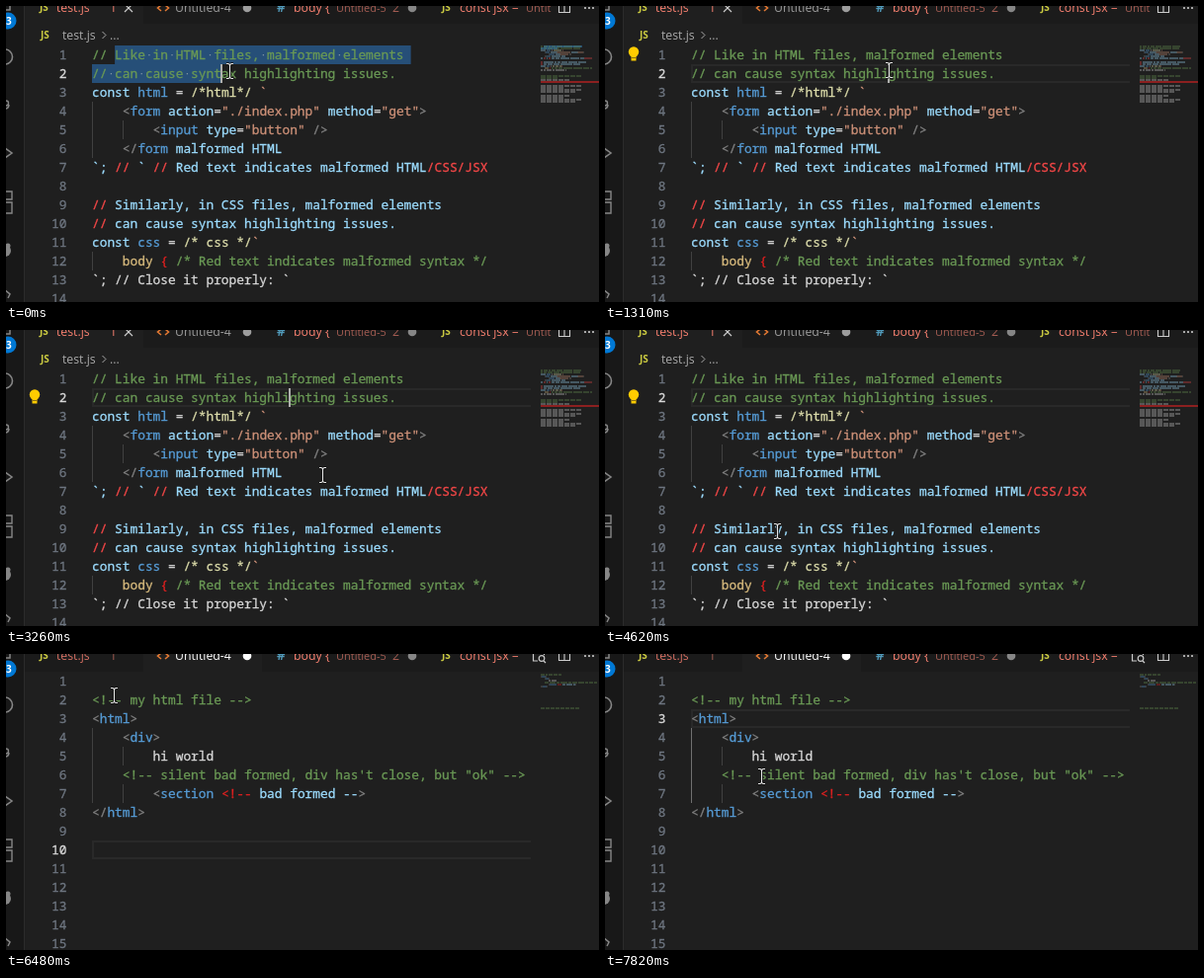
These frames come from a looping animation (600x300 px, 8000 ms). An HTML page with a canvas:

```html
<!DOCTYPE html>
<html lang="en">
<head>
<meta charset="utf-8">
<title>Editor syntax highlighting</title>
<style>
  html, body { margin: 0; width: 100%; height: 100%; overflow: hidden; background: #1f1f1f; }
  canvas { display: block; width: 600px; height: 300px; }
</style>
</head>
<body>
<canvas id="stage" width="600" height="300"></canvas>
<script>
const ctx = document.getElementById('stage').getContext('2d');
const LOOP = 8000, LEFT = 87, CHAR = 7.7, ROW = 19, MAP_X = 541, TABS = 18;
const RELEASE = 650, CLEAR = 1310, SWITCH = 5670, PRESS = 6600, CLICK = 7250;
const SANS = '"Open Sans", "Noto Sans", sans-serif';
const CODE = '12.83px "Noto Sans Mono", monospace';
const UI = `12.3px ${SANS}`, SMALL = `11px ${SANS}`, BADGE = `bold 10px ${SANS}`;
const GRAY = '#868686', SALMON = '#f88070', DIM = '#a35c52', YELLOW = '#cbcb41';

// "~x" switches to colour x inside a line of code
const COLORS = {
  c: '#6a9955', k: '#569cd6', a: '#9cdcfe', s: '#ce9178', w: '#d8d8d8',
  r: '#f44747', R: '#e02020', g: '#808080', y: '#dcdcaa', b: '#d7ba7d'
};

const jsFile = {
  top: TABS + 22, count: 14, lastRow: 29,
  lines: parse([
    '~c// Like in HTML files, malformed elements',
    '~c// can cause syntax highlighting issues.',
    '~aconst ~khtml ~w= ~y/*html*/ ~s`',
    '    ~g<~kform ~aaction~w=~s"./index.php" ~amethod~w=~s"get"~g>',
    '        ~g<~kinput ~atype~w=~s"button" ~g/>',
    '    ~g</~kform ~amalformed HTML',
    '~a`; ~r// ~a` ~r// ~aRed text indicates malformed HTML~r/CSS/JSX',
    '',
    '~r// ~aSimilarly, in CSS files, malformed elements',
    '~r// ~acan cause syntax highlighting issues.',
    '~aconst ~kcss ~w= ~y/* css */~s`',
    '    ~bbody ~R{ ~c/* Red text indicates malformed syntax */',
    '~w`; // Close it properly: `'
  ])
};

const htmlFile = {
  top: TABS, count: 15, lastRow: 8,
  lines: parse([
    '',
    '~c<!-- my html file -->',
    '~g<~khtml~g>',
    '    ~g<~kdiv~g>',
    '        ~whi world',
    '    ~c<!-- silent bad formed, div has\'t close, but "ok" -->',
    '        ~g<~ksection ~R<!-- ~abad formed --~g>',
    '~g</~khtml~g>'
  ])
};

// Pointer path: time, x, y; eased between points
const path = [
  [0, 226, 66], [RELEASE, 384, 67], [910, 384, 67], [CLEAR, 287, 65], [1710, 287, 67],
  [2300, 265, 71], [2850, 180, 135], [3260, 320, 147], [3540, 456, 179], [4340, 124, 203],
  [4620, 174, 204], [5200, 191, 20], [SWITCH, 191, 20], [6090, 340, 110], [6480, 109, 42],
  [PRESS, 90, 47], [CLICK, 280, 65], [7820, 158, 124], [LOOP, 158, 124]
];

function parse(rows) {
  return rows.map(row => {
    let col = 0, color = COLORS.w;
    const parts = [];
    row.split('~').forEach((piece, i) => {
      if (i) { color = COLORS[piece[0]]; piece = piece.slice(1); }
      if (piece) parts.push({ col, color, text: piece });
      col += piece.length;
    });
    const text = parts.map(p => p.text).join('');
    return { parts, text, indent: text.search(/\S|$/) };
  });
}

function pointer(t) {
  const i = path.findIndex(p => p[0] > t);
  const [a, ax, ay] = path[i - 1], [b, bx, by] = path[i];
  const u = (t - a) / (b - a), f = u * u * (3 - 2 * u);
  return { x: ax + (bx - ax) * f, y: ay + (by - ay) * f };
}

const columnAt = (t, limit) =>
  Math.min(limit, Math.max(0, Math.floor((pointer(t).x - LEFT - 4) / CHAR)));

function rect(x, y, w, h, color) {
  ctx.fillStyle = color;
  ctx.fillRect(x, y, w, h);
}

function label(text, x, y, color, font = UI) {
  ctx.font = font;
  ctx.fillStyle = color;
  ctx.fillText(text, x, y);
}

function codeText(text, x, y, color) {
  label(text, x, y, color, CODE);
  ctx.strokeStyle = color;
  ctx.lineWidth = .3;
  ctx.strokeText(text, x, y);
}

function dot(x, y, r, color) {
  ctx.fillStyle = color;
  ctx.beginPath();
  ctx.arc(x, y, r, 0, 7);
  ctx.fill();
}

function stroke(d, color, width = 1) {
  ctx.strokeStyle = color;
  ctx.lineWidth = width;
  ctx.stroke(new Path2D(d));
}

// Everything about the editor that depends on time
function editorState(t) {
  if (t < CLEAR) {
    const end = columnAt(Math.min(t, RELEASE), 40);
    return { file: jsFile, line: 2, caret: end, caretOn: true, bulb: t >= 910 ? 1 : 0,
             selection: [[1, 3, 41.9], [2, 0, end]] };
  }
  if (t < SWITCH) {
    const caretOn = (t - 1240) % 950 < 475;
    return { file: jsFile, line: 2, caret: 26, caretOn, bulb: t < 1460 ? 1 : 2, selection: [] };
  }
  if (t < PRESS) return { file: htmlFile, line: 10, caret: 0, caretOn: t < 6090, selection: [] };
  if (t < CLICK) {
    const end = columnAt(t, 21);
    return { file: htmlFile, line: 2, caret: end, caretOn: true, selection: end ? [[2, 0, end]] : [] };
  }
  return { file: htmlFile, line: 3, caret: 6, caretOn: t < 7700, selection: [] };
}

function drawGuides({ lines, top }, active) {
  lines.forEach((row, i) => {
    for (let col = 0; col < row.indent; col += 4) {
      rect(Math.round(LEFT + col * CHAR), top + i * ROW, 1, ROW, active && !col ? '#707070' : '#404040');
    }
  });
}

function drawCode({ file, line, caret, caretOn, selection }) {
  const rowTop = n => file.top + (n - 1) * ROW;

  if (!selection.length) {
    rect(LEFT, rowTop(line), 444, ROW, '#292929');
    rect(LEFT + 2, rowTop(line) + 2, 442, ROW - 4, '#1f1f1f');
  }
  for (const [n, from, to] of selection) {
    rect(LEFT + from * CHAR, rowTop(n), (to - from) * CHAR, ROW, '#264f78');
  }
  drawGuides(file, file === htmlFile && line === 3);

  ctx.textAlign = 'right';
  for (let n = 1; n <= file.count; n++) {
    codeText(n, 61.5, rowTop(n) + 14, n === line ? '#d8d8d8' : '#6e7681');
  }
  ctx.textAlign = 'left';
  file.lines.forEach((row, i) => {
    for (const p of row.parts) codeText(p.text, LEFT + p.col * CHAR, rowTop(i + 1) + 14, p.color);
  });
  for (const [n, from, to] of selection) {
    const { text } = file.lines[n - 1];
    for (let c = from; c < Math.min(to, text.length); c++) {
      if (text[c] === ' ') rect(LEFT + (c + .5) * CHAR - .5, rowTop(n) + 9, 1.3, 1.3, '#7f93a3');
    }
  }
  if (caretOn) rect(Math.round(LEFT + caret * CHAR) - 1, rowTop(line), 2, ROW, '#aeafad');
}

function drawMinimap({ file, selection }) {
  const rowTop = n => file.top + (n - 1) * 2;
  const dash = (n, col, length, color) => rect(MAP_X + col, rowTop(n) + .4, length, 1.2, color);

  for (const [n, from, to] of selection) rect(MAP_X + from, rowTop(n), to - from, 2, '#264f78');
  ctx.globalAlpha = .5;
  file.lines.forEach((row, i) => {
    for (const p of row.parts) {
      for (const word of p.text.matchAll(/\S+/g)) dash(i + 1, p.col + word.index, word[0].length, p.color);
    }
  });
  // code further down the file
  for (let n = file.lines.length + 2; n <= file.lastRow; n++) {
    const length = n % 5 ? 16 + 22 * Math.abs(Math.sin(n * n)) : 0;
    for (let c = 0; c < length; c += 6) dash(n, c, 5, n < 18 ? COLORS.c : COLORS.w);
  }
  if (file === htmlFile) for (let c = 0; c < 40; c += 5) dash(19, c, 4, COLORS.c);
  ctx.globalAlpha = 1;
  if (file === jsFile) rect(MAP_X, 76, 59, 2, '#8c2020');
}

function drawTabs(file, hover) {
  const js = file === jsFile;
  rect(19, 0, 581, TABS, '#1b1b1b');
  rect(js ? 19 : 139, 0, 120, TABS, '#1f1f1f');
  if (hover) rect(19, 15, 468, 3, '#4a4a4a');

  label('JS', 34, 5, YELLOW, BADGE);
  label('test.js', 51, 6, js ? SALMON : '#d56f62');
  label('1', 105, 6, js ? SALMON : DIM);
  if (js) stroke('M120-2 L128 6 M128-2 L120 6', '#cccccc', 1.2);

  stroke('M157-1 L153.500 2 L157 5 M161-1 L164.500 2 L161 5', '#e37933', 1.6);
  label('Untitled-4', 171, 6, js ? '#9d9d9d' : '#ffffff');
  dot(244, 2, 4.3, js ? '#9d9d9d' : '#ffffff');

  label('#', 274, 6, '#519aba', `bold 13px ${SANS}`);
  label('body {', 291, 6, SALMON);
  label('Untitled-5', 334, 6, DIM, SMALL);
  label('2', 391, 6, DIM);
  dot(411, 2, 4.3, GRAY);

  label('JS', 441, 5, YELLOW, BADGE);
  label('const jsx =', 459, 6, SALMON);
  if (js) label('Untit', 526, 6, DIM, SMALL);
  else {
    stroke('M538 7 H533.500 V-2 M540-2 H544.500 V1 M544 7 L546 9', '#cccccc', 1.2);
    ctx.beginPath();
    ctx.arc(542, 4.5, 2.8, 0, 7);
    ctx.stroke();
  }
  stroke('M559.500-2 V6.500 H570.500 V-2 M565-2 V6', '#cccccc', 1.1);
  for (let x = 586; x < 596; x += 4) dot(x, 2, 1.1, '#cccccc');

  if (js) {
    label('JS', 35, 33, YELLOW, BADGE);
    label('test.js', 57, 34, '#a9a9a9');
    stroke('M97.500 26 L101 29.500 L97.500 33', '#a9a9a9');
    label('...', 105, 34, '#a9a9a9');
  }
}

function drawActivityBar() {
  rect(0, 0, 18, 300, '#181818');
  rect(18, 0, 1, 300, '#2b2b2b');
  stroke('M0 4 H4 V0', GRAY, 1.5);
  dot(2, 15, 8.5, '#0078d4');
  label('3', 0, 19, '#ffffff', BADGE);
  stroke('M-1 44 A7.500 7.500 0 0 1-1 59', GRAY, 1.6);
  stroke('M-1 104 Q3 104 3 100 M0 96 A2.500 2.500 0 1 1 0 101', GRAY, 1.4);
  stroke('M-1 144 L6 149 L-1 154', GRAY, 1.5);
  stroke('M-2 188 H6 V196 H-2 M-2 199 H6 V210 H-2', GRAY, 1.4);
  dot(-1, 248, 6, GRAY);
  dot(2, 243, 2.5, GRAY);
  stroke('M-1 288 L4 292 L2 296', GRAY, 1.5);
}

function drawBulb(line) {
  const y = jsFile.top + (line - .5) * ROW - 2;
  dot(29, y - 1, 5.2, '#ffcc00');
  rect(26.5, y + 2, 5, 6, '#ffcc00');
  rect(26.5, y + 4.5, 5, 1, '#8a7010');
}

function drawPointer({ x, y }, hand) {
  ctx.save();
  ctx.translate(Math.round(x), Math.round(y));
  if (hand) {
    const shape = 'M-3-9 Q-1-10 0-8 V-2 Q2-3 3-1 Q5-2 6 0 Q8-1 8 2 V6 L6 11 H-2 L-7 4 Q-8 1-5 2 L-3 4 Z';
    ctx.translate(0, 1);
    ctx.scale(1.15, 1.2);
    ctx.fillStyle = '#ffffff';
    ctx.fill(new Path2D(shape));
    stroke(shape, '#000000', .8);
  } else {
    const beam = 'M-3-7.500 H-1 L.5-6.500 L2-7.500 H4 M.5-7 V7 M-3 7.500 H-1 L.5 6.500 L2 7.500 H4';
    stroke(beam, '#101010', 2.6);
    stroke(beam, '#e6e6e6', 1.1);
  }
  ctx.restore();
}

function draw(t) {
  const state = editorState(t), mouse = pointer(t);
  const overTab = mouse.y < 24;
  rect(0, 0, 600, 300, '#1f1f1f');
  drawCode(state);
  drawMinimap(state);
  drawTabs(state.file, overTab);
  drawActivityBar();
  if (state.bulb) drawBulb(state.bulb);
  drawPointer(mouse, overTab);
}

const start = performance.now();
function loop() {
  draw((performance.now() - start) % LOOP);
  requestAnimationFrame(loop);
}
loop();
</script>
</body>
</html>
```
